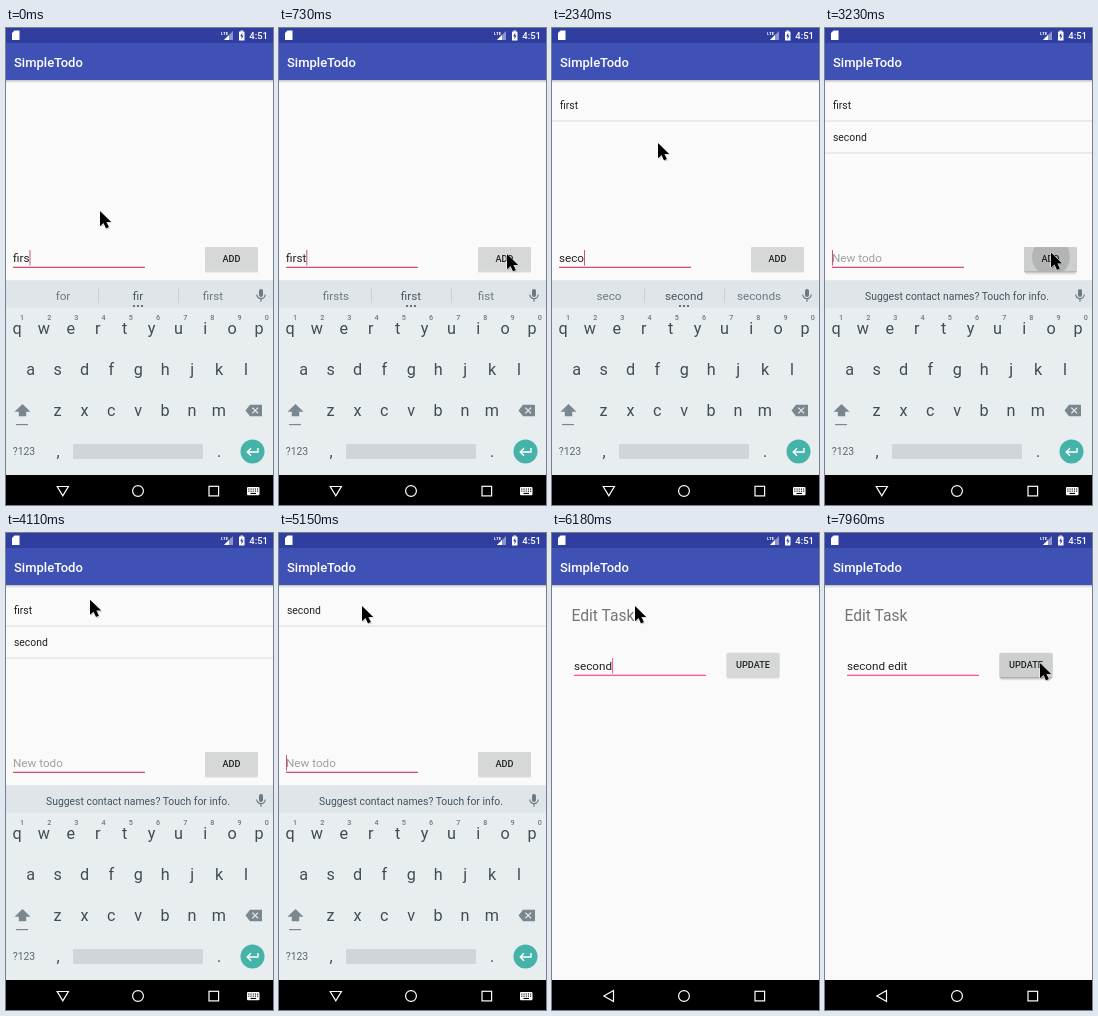
An HTML page that plays this animation: 267 by 477 pixels, repeating every 8 s.

```html
<!DOCTYPE html>
<html lang="en">
<head>
<meta charset="utf-8">
<title>Todo app demo</title>
<style>
  html, body { margin: 0; height: 100%; overflow: hidden; background: #fafafa; }
  svg { display: block; width: 100vw; height: 100vh; font-family: Roboto, sans-serif; }
</style>
</head>
<body>
<svg id="stage" viewBox="0 0 267 477" preserveAspectRatio="none"></svg>
<script>
const LOOP = 8000, STEP = 147.2, LEAD = 16;
const stage = document.getElementById('stage');
const pen = document.createElement('canvas').getContext('2d');

// Pointer stops: [step, x, y]
const route = [
  [0, 94, 183], [1, 94, 183], [3, 205, 218], [4, 247, 229], [5, 228, 226], [8, 226, 225],
  [9, 158.5, 163], [10, 116, 124], [11, 106, 115], [18, 106, 115], [20, 190, 192],
  [21, 226, 224.5], [23, 226, 224.5], [24, 179, 165], [25, 118, 90], [26, 84, 58],
  [29, 84, 71], [33, 84, 71], [34, 83, 73], [48, 83, 73], [50, 150, 101], [52, 215, 130], [54, 215, 130]
];

const hints = {
  firs: ['for', 'fir', 'first'], first: ['firsts', 'first', 'fist'],
  s: ['see', 's', 'so'], se: ['see', 'se', 'set'], sec: ['sec', 'second', 'secret'],
  seco: ['seco', 'second', 'seconds'], secon: ['secon', 'second', 'seconds'],
  second: ['seconds', 'second', 'secondary']
};

const between = (k, a, b) => k >= a && k <= b;

function pointer(k) {
  const i = Math.max(1, route.findIndex(p => p[0] >= k));
  const [k0, x0, y0] = route[i - 1], [k1, x1, y1] = route[i];
  const u = (k - k0) / (k1 - k0);
  return [x0 + (x1 - x0) * u, y0 + (y1 - y0) * u];
}

const rect = (x, y, w, h, fill, extra = '') =>
  `<rect x="${x}" y="${y}" width="${w}" height="${h}" fill="${fill}" ${extra}/>`;
const text = (s, x, y, size, fill, extra = '') =>
  `<text x="${x}" y="${y}" font-size="${size}" fill="${fill}" ${extra}>${s}</text>`;
const path = (d, fill, extra = '') => `<path d="${d}" fill="${fill}" ${extra}/>`;
const MID = 'text-anchor="middle"', BOLD = 'font-weight="500"';

function shadow(y) {
  return [.2, .1, .04].map((o, i) => rect(0, y + i, 267, 1, '#000', `opacity="${o}"`)).join('');
}

function appBar() {
  return rect(0, 0, 267, 447, '#fafafa') + rect(0, 0, 267, 15, '#303f9f') +
    rect(0, 15, 267, 37, '#3f51b5') + shadow(52) + text('SimpleTodo', 8, 38.6, 13, '#fff', BOLD);
}

function field(value, x, y, caret, color) {
  pen.font = '11.7px Roboto, sans-serif';
  const end = x + pen.measureText(value).width;
  return (value ? text(value, x, y, 11.7, '#212121') : text('New todo', x, y, 11.7, '#a0a0a0')) +
    rect(x, y + 4.7, 132, 1.3, color) + (caret ? rect(end, y - 12, 1, 15.5, color) : '');
}

function button(label, x, y, pressed, ripple) {
  return rect(x, y + 1, 53, 24.6, '#000', `rx="1.5" opacity="${pressed ? .22 : .13}"`) +
    (pressed ? rect(x + 1, y + 2, 51, 25.4, '#000', 'rx="2" opacity=".1"') : '') +
    rect(x, y, 53, 24.2, pressed ? '#cdcfcf' : '#d6d7d7', 'rx="1.3"') +
    (ripple ? `<clipPath id="clip">${rect(x, y, 53, 24.2, '#000')}</clipPath>
      <circle cx="${x + 27}" cy="${y + 10}" r="${ripple}" opacity=".13" clip-path="url(#clip)"/>` : '') +
    text(label, x + 26.5, y + 15.4, 9.1, '#212121', MID + BOLD.padStart(18));
}

function listScreen(k, typed) {
  const rows = k < 7 ? [] : k < 22 ? ['first'] : k < 33 ? ['first', 'second'] : ['second'];
  const caret = typed || between(k, 7, 9) || between(k, 22, 24) || between(k, 29, 31) || between(k, 35, 38);
  const ripple = between(k, 6, 7) ? 12 + (k - 6) * 10 : between(k, 21, 23) ? 9 + (k - 21) * 10 : 0;
  const list = rows.map((s, i) =>
    text(s, 8, 80.7 + 32 * i, 10.4, '#212121') + rect(0, 92.5 + 32 * i, 267, 1, '#dedede')).join('');
  const touch = between(k, 39, 41) ? rect(0, 61, 267, 32, '#000', 'opacity=".06"') : '';
  return appBar() + touch + list + field(typed, 7, 234, caret, '#cf5378') +
    button('ADD', 199, 219, between(k, 6, 9) || between(k, 21, 23), ripple);
}

function editScreen(k) {
  const typed = 'second' + ' edit'.slice(0, Math.max(0, k - 45));
  return appBar() + text('Edit Task', 19.5, 87.5, 15.6, '#757575') +
    field(typed, 22, 137, !between(k, 44, 45) && k < 53, '#ff5794') +
    button('UPDATE', 174.5, 119.8, k > 53, 0);
}

function keyRow(letters, x, y) {
  return [...letters].map((c, i) => text(c, x + i * 26.9, y, 16.2, '#3f4d55', MID)).join('');
}

function keyboard(typed) {
  const ink = '#6c7a82';
  let s = rect(0, 252, 267, 1, '#000', 'opacity=".07"') + rect(0, 253, 267, 194, '#e8edf0') +
    rect(0, 253, 267, 26.5, '#dfe5e8');
  if (typed) {
    s += hints[typed].map((w, i) => text(w, 57 + 75 * i, 272, 11.7, i === 1 ? '#4a5860' : ink, MID)).join('') +
      rect(92, 260, 1, 15, '#cbd2d5') + rect(172, 260, 1, 15, '#cbd2d5') +
      [128, 132, 136].map(x => `<circle cx="${x}" cy="278" r="1.1" fill="#4a5860"/>`).join('');
  } else {
    s += text('Suggest contact names? Touch for info.', 132, 271.5, 10.4, '#46545c', MID);
  }
  // Microphone
  s += rect(253, 261, 4, 8, ink, 'rx="2"') +
    path('M250.8 266.5a4.2 4.2 0 0 0 8.4 0M255 270.7v3', 'none', `stroke="${ink}" stroke-width="1.2"`);
  s += keyRow('qwertyuiop', 11, 306) + keyRow('asdfghjkl', 24.7, 347) + keyRow('zxcvbnm', 51.5, 388);
  s += [...'1234567890'].map((c, i) => text(c, 16 + i * 27.2, 291.5, 7.2, ink, MID + ' ' + BOLD)).join('');
  // Shift, backspace
  s += path('M16.5 376l8 7.8h-4.3v4.4h-7.4v-4.4h-4.3z', '#7a878e') + rect(10, 396, 12, 1.2, '#7a878e') +
    path('M239.5 382.5l4.5-5.7h12v11.4h-12z', '#7a878e') +
    path('M246.3 379.6l5.8 5.8m0-5.8l-5.8 5.8', 'none', 'stroke="#e8edf0" stroke-width="1.2"');
  s += text('?123', 18, 427, 10.4, '#5b6970', MID) + text(',', 52, 429, 16, '#3f4d55', MID) +
    rect(67, 416, 130, 15, '#cfd5d8', 'rx="1.5"') + text('.', 213, 429, 16, '#3f4d55', MID);
  return s + '<circle cx="246.5" cy="423.5" r="12" fill="#45b3a8"/>' +
    path('M252 420v4h-10.5m3.5-3.8l-3.8 3.8l3.8 3.8', 'none', 'stroke="#fff" stroke-width="1.4"');
}

function systemBars(keysUp) {
  const line = 'stroke="#fff" stroke-width="1.2"';
  let s = rect(0, 0, 267, 15, '#303f9f') + path('M8.5 2.5h5v9.5h-7.5v-7z', '#fff') +
    path('M218 12l9-9v9z', '#fff', 'opacity=".45"') + path('M218 12l5-5v5z', '#fff') +
    text('LTE', 215, 6.5, 4.4, '#fff', 'font-weight="700"') +
    rect(233, 3.5, 5.5, 9, '#fff', 'rx=".6"') + rect(234.5, 2.5, 2.5, 1.2, '#fff') +
    path('M236.2 4.8l-2 3.5h1.3v2.9l2-3.7h-1.3z', '#303f9f') +
    text('4:51', 262, 11, 9.5, '#fff', 'text-anchor="end" ' + BOLD);
  s += rect(0, 447, 267, 30, '#000') +
    path(keysUp ? 'M51.2 458.5h11.2l-5.6 9.3z' : 'M61.5 457.5v11l-9.6-5.5z', 'none', line) +
    `<circle cx="132" cy="463" r="5.4" fill="none" ${line}/>` +
    rect(203, 458.3, 9.6, 9.6, 'none', line);
  if (keysUp) {
    s += rect(241, 459, 12.5, 8.2, '#fff', 'rx="1"');
    for (let i = 0; i < 10; i++) s += rect(242.3 + i % 5 * 2.2, 460.5 + (i / 5 | 0) * 2.1, 1.1, 1.1, '#000');
    s += rect(244.5, 464.9, 5.5, 1.1, '#000');
  }
  return s;
}

function arrow([x, y]) {
  const d = 'M0 0v15.2l3.5-3.2l2.5 5.4l2.9-1.3l-2.5-5.2h4.8z';
  return `<g transform="translate(${x} ${y})">` +
    path(d, '#000', 'transform="translate(1 1.2)" opacity=".2"') +
    path(d, '#000', 'stroke="#fff" stroke-width="1" paint-order="stroke"') + '</g>';
}

function scene(k) {
  const typed = k < 1 ? 'firs' : k < 7 ? 'first' : between(k, 13, 21) ? 'second'.slice(0, k - 12) : '';
  let s = k < 42 ? listScreen(k, typed) : '';
  if (k >= 40) {
    const [dy, alpha] = k === 40 ? [30, .3] : k === 41 ? [3, .95] : [0, 1];
    s += `<g transform="translate(0 ${dy})" opacity="${alpha}">${editScreen(k)}</g>`;
  }
  if (k < 42) {
    const leaving = k === 41;
    s += `<g transform="translate(0 ${leaving ? 70 : 0})" opacity="${leaving ? .5 : 1}">${keyboard(typed)}</g>`;
  }
  return s + systemBars(k < 39) + arrow(pointer(k));
}

let shown = -1;
function tick() {
  const k = Math.min(54, Math.floor((performance.now() % LOOP + LEAD) / STEP));
  if (k !== shown) stage.innerHTML = scene(shown = k);
  requestAnimationFrame(tick);
}
tick();
</script>
</body>
</html>
```
